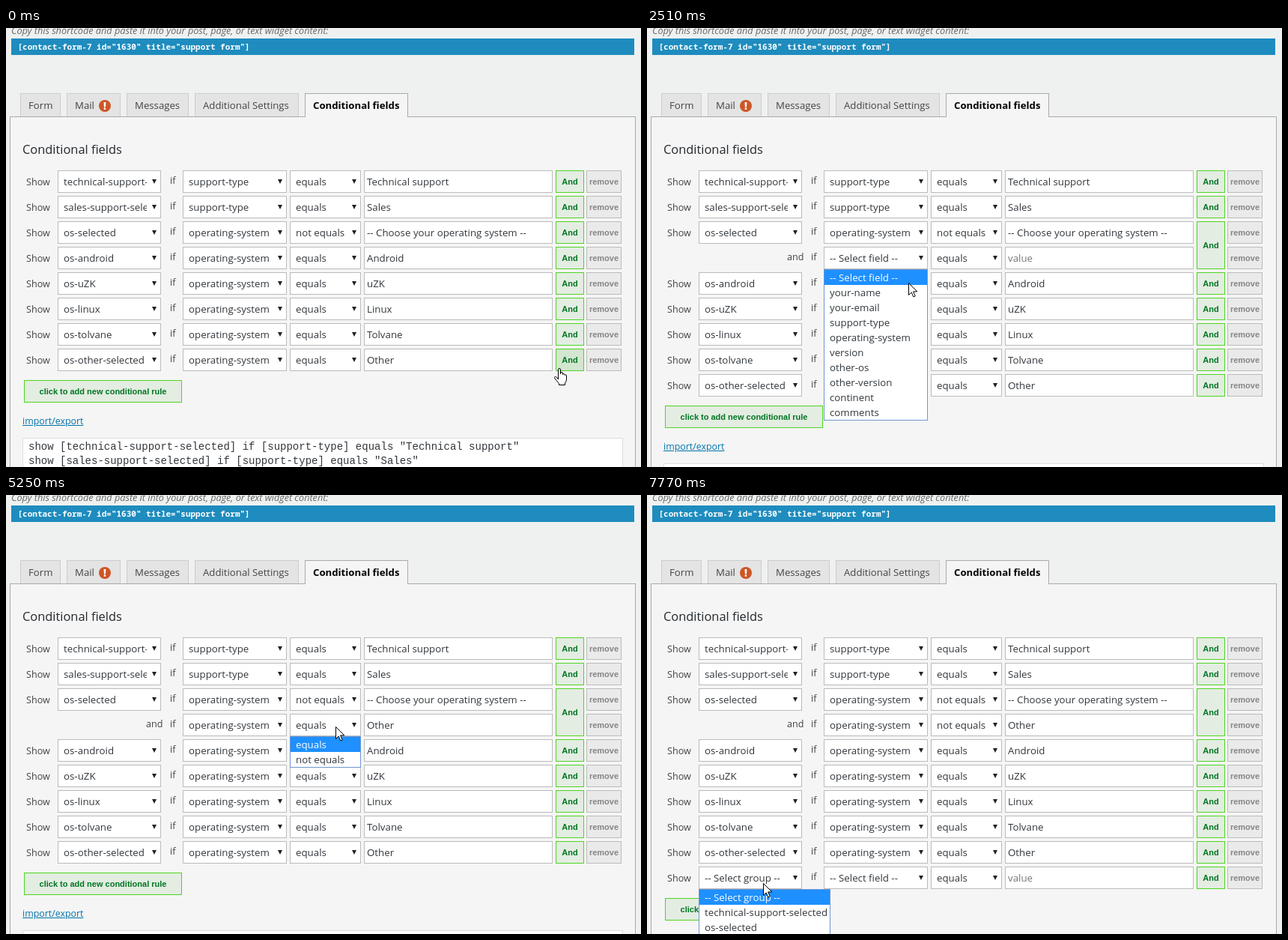
Recreate the animation shown at these times as an HTML page. Size 848 by 586 pixels, loop 8000 ms.

```html
<!DOCTYPE html>
<html lang="en">
<head>
<meta charset="utf-8">
<title>Conditional fields</title>
<style>
  html, body { margin: 0; width: 100%; height: 100%; overflow: hidden; background: #eff1f1; }
  body { font: 13.3px "Open Sans", "Noto Sans", sans-serif; color: #32373c; }
  #stage { position: relative; width: 848px; height: 586px; overflow: hidden; }
  #stage div, #stage svg { position: absolute; box-sizing: border-box; white-space: pre; }
  #stage .hidden { display: none; }
  .copy { font-size: 12.7px; font-style: italic; line-height: 20px; color: #666; }
  .code { background: #1e8cbe; color: #fff; font: 600 11px/22px "Noto Sans Mono", monospace; padding-left: 8.5px; }
  .panel { background: #f5f5f5; border: 1px solid #aaa; }
  .tab { background: #e4e4e4; border: 1px solid #ccc; border-bottom: 0; padding-left: 10px; font-size: 13.2px; line-height: 30px; color: #444; }
  .tab.on { background: #f5f5f5; border-color: #aaa; font-weight: 700; color: #000; }
  .badge { background: #ce5626; border-radius: 50%; color: #fff; font-weight: 800; line-height: 16px; text-align: center; }
  .title { font-size: 16.4px; font-weight: 500; line-height: 30px; color: #23282d; }
  .label { font-size: 12.6px; line-height: 30px; color: #444; }
  .select, .input { background: #fff; border: 1px solid #bbb; line-height: 28px; }
  .select span { position: absolute; left: 7px; right: 18px; overflow: hidden; }
  .select::after { content: ""; position: absolute; right: 5px; top: 11px; border: solid transparent; border-width: 6px 3.5px 0; border-top-color: #222; }
  .input { padding-left: 3px; }
  .input .empty { color: #777; }
  .caret { position: absolute; top: 4px; height: 19px; width: 1px; background: #000; }
  .button { font: 700 11px "Liberation Sans", Arial, sans-serif; display: flex; align-items: center; justify-content: center; }
  .add { border: 1px solid #4ed521; color: #007521; background: rgba(75, 169, 61, .1); }
  .add.hover { background: rgba(75, 169, 61, .2); }
  .remove { border: 1px solid #bbb; color: #858585; background: rgba(133, 133, 133, .1); }
  .link { font-size: 12.4px; line-height: 20px; color: #0073aa; text-decoration: underline; }
  .area { background: #fff; border: 1px solid #ddd; padding: 2px 7px; font: 14px/19px "Liberation Mono", "Courier New", monospace; }
  .menu { background: #fff; border: 1px solid #6f96d2; }
  #stage .menu div { position: static; height: 20px; line-height: 20px; padding-left: 7px; }
  #stage .menu .hot { background: #1e90ff; color: #fff; }
  .cursor { overflow: visible; left: 0; top: 0; width: 1px; height: 1px; }
  .cursor path { fill: #fff; stroke: #000; stroke-linejoin: round; }
</style>
</head>
<body>
<div id="stage"></div>
<script>
const LOOP = 8000, STEP = 34;
const CLICK = { and: 840, fieldOpen: 2100, fieldPick: 3410, opOpen: 5250, opPick: 6170, rule: 7200, groupOpen: 7750 };
const TYPING = [[4120, 'O'], [4340, 'Ot'], [4390, 'Oth'], [4440, 'Othe'], [4590, 'Other']];

// Pointer path: time, x, y
const PATH = [
  [0, 738, 454], [30, 738, 454], [150, 743, 410], [300, 768, 300], [360, 769, 271], [420, 763, 280],
  [900, 763, 280], [1250, 665, 296], [1630, 496, 313], [2060, 350, 306], [2300, 350, 306], [2510, 349, 340],
  [3100, 346, 408], [3180, 346, 409], [3380, 346, 409], [3720, 490, 299], [3920, 530, 308],
  [4930, 530, 308], [5220, 440, 309], [5550, 440, 309], [5940, 454, 350], [6460, 454, 350],
  [6730, 89, 526], [7300, 89, 526], [7700, 155, 518], [LOOP, 155, 518]
];

const stage = document.getElementById('stage');

function box(parent, cls, x, y, w, h, html = '') {
  const el = document.createElement('div');
  el.className = cls;
  el.style.cssText = `left:${x}px;top:${y}px;` + (w ? `width:${w}px;height:${h}px` : '');
  el.innerHTML = html;
  parent.append(el);
  return el;
}

const layer = (parent = stage) => box(parent, '', 0, 0, 848, 586);
const select = (parent, x, y, w, text) =>
  box(parent, 'select', x, y, w, 30, `<span>${text}</span>`).firstChild;

function condition(parent, y, field, op, value) {
  box(parent, 'label', 219, y - 1, 0, 0, 'if');
  const parts = {
    field: select(parent, 236, y, 139, field),
    op: select(parent, 379, y, 95, op),
    input: box(parent, 'input', 478, y, 252, 30, value || '<span class="empty">value</span>')
  };
  box(parent, 'button remove', 775, y, 47, 30, 'remove');
  return parts;
}

function rule(parent, y, group, field, op, value) {
  box(parent, 'label', 27, y + 1, 0, 0, 'Show');
  select(parent, 69, y, 138, group);
  condition(parent, y, field, op, value);
  return box(parent, 'button add', 734, y, 38, 30, 'And');
}

function menu(x, y, w, items) {
  const el = box(stage, 'menu', x, y, w, items.length * 20 + 2);
  el.innerHTML = items.map(item => `<div>${item}</div>`).join('');
  return { el, y };
}

box(stage, 'copy', 7, -7, 0, 0, 'Copy this shortcode and paste it into your post, page, or text widget content:');
box(stage, 'code', 7, 14, 832, 22, '[contact-form-7 id="1630" title="support form"]');
box(stage, 'panel', 5, 118, 836, 500);
[['Form', 19, 54], ['Mail', 81, 72], ['Messages', 161, 83], ['Additional Settings', 252, 139]]
  .forEach(([text, x, w]) => box(stage, 'tab', x, 87, w, 31, text));
box(stage, 'tab on', 399, 87, 138, 32, 'Conditional fields');
box(stage, 'badge', 124, 96, 16, 16, '!');
box(stage, 'title', 22, 147, 0, 0, 'Conditional fields');

const OS = 'operating-system';
rule(stage, 190, 'technical-support-selected', 'support-type', 'equals', 'Technical support');
rule(stage, 224, 'sales-support-selected', 'support-type', 'equals', 'Sales');
const andButton = rule(stage, 258, 'os-selected', OS, 'not equals', '-- Choose your operating system --');

const extra = layer();
box(extra, 'label', 187, 291, 0, 0, 'and');
const added = condition(extra, 292, '-- Select field --', 'equals', '');

const lower = layer();
[['os-android', 'Android'], ['os-uZK', 'uZK'], ['os-linux', 'Linux'], ['os-tolvane', 'Tolvane'], ['os-other-selected', 'Other']]
  .forEach(([group, value], i) => rule(lower, 292 + i * STEP, group, OS, 'equals', value));

const newRule = layer();
rule(newRule, 496, '-- Select group --', '-- Select field --', 'equals', '');

const footer = layer();
box(footer, 'button add', 24, 470, 211, 30, 'click to add new conditional rule');
box(footer, 'link', 22, 515, 0, 0, 'import/export');
box(footer, 'area', 22, 547, 802, 160,
  'show [technical-support-selected] if [support-type] equals "Technical support"\n' +
  'show [sales-support-selected] if [support-type] equals "Sales"');

const fieldMenu = menu(236, 322, 139, ['-- Select field --', 'your-name', 'your-email', 'support-type', OS,
  'version', 'other-os', 'other-version', 'continent', 'comments']);
const opMenu = menu(379, 322, 95, ['equals', 'not equals']);
const groupMenu = menu(69, 526, 176, ['-- Select group --', 'technical-support-selected', 'os-selected',
  'sales-support-selected']);

const SHAPES = {
  arrow: 'M.5.5v16l3.7-3.6 2.6 6 2.4-1-2.6-6h5.2z',
  hand: 'M-.5 13V2a1.5 1.5 0 0 1 3 0v6V7a1.5 1.5 0 0 1 3 0v1.5a1.4 1.4 0 0 1 2.6 0v1a1.3 1.3 0 0 1 2.4.5v5q0 3-2 5v2.5h-8v-2L-5 14q-1.2-2 .3-2.6 1.5-.4 2.7 1.6l1.5 2z',
  beam: 'M-3.5-6.5h3M.5-6.5h3M0-6V7M-3.5 7.5h3M.5 7.5h3'
};
stage.insertAdjacentHTML('beforeend', '<svg class="cursor"><path/></svg>');
const cursor = stage.lastChild, shape = cursor.firstChild;

function pointerAt(t) {
  const i = PATH.findIndex(p => p[0] > t);
  const [t0, x0, y0] = PATH[i - 1], [t1, x1, y1] = PATH[i];
  const k = (t - t0) / (t1 - t0);
  return [Math.round(x0 + (x1 - x0) * k), Math.round(y0 + (y1 - y0) * k)];
}

const toggle = (el, on) => el.classList.toggle('hidden', !on);
const setText = (el, text) => { if (el.textContent !== text) el.textContent = text; };

function showMenu({ el, y }, open, py) {
  toggle(el, open);
  const hot = Math.max(0, Math.floor((py - y - 1) / 20));
  [...el.children].forEach((item, i) => item.classList.toggle('hot', i === hot));
}

const buttons = [...stage.querySelectorAll('.button')];
const inputs = [...stage.querySelectorAll('.input')];

function draw(now) {
  const t = now % LOOP;
  const split = t >= CLICK.and, ruled = t >= CLICK.rule;
  const [x, y] = pointerAt(t);

  andButton.style.height = (split ? 64 : 30) + 'px';
  toggle(extra, split);
  toggle(newRule, ruled);
  lower.style.top = (split ? STEP : 0) + 'px';
  footer.style.top = STEP * (split + ruled) + 'px';

  setText(added.field, t < CLICK.fieldPick ? '-- Select field --' : OS);
  setText(added.op, t < CLICK.opPick ? 'equals' : 'not equals');
  const typed = TYPING.filter(([at]) => t >= at).pop();
  const caret = typed && t < CLICK.opOpen ? '<i class="caret"></i>' : '';
  added.input.innerHTML = typed ? typed[1] + caret : '<span class="empty">value</span>';

  showMenu(fieldMenu, t >= CLICK.fieldOpen && t < CLICK.fieldPick, y);
  showMenu(opMenu, t >= CLICK.opOpen && t < CLICK.opPick, y);
  showMenu(groupMenu, t >= CLICK.groupOpen, y);

  const origin = stage.getBoundingClientRect();
  const under = el => {
    const r = el.getBoundingClientRect(), px = x + origin.left, py = y + origin.top;
    return px >= r.left && px < r.right && py >= r.top && py < r.bottom;
  };
  const hovered = buttons.find(under);
  buttons.forEach(b => b.classList.toggle('hover', b === hovered));
  const kind = hovered ? 'hand' : inputs.some(under) ? 'beam' : 'arrow';
  shape.setAttribute('d', SHAPES[kind]);
  cursor.style.transform = `translate(${x + (kind === 'beam' ? .5 : 0)}px, ${y}px)`;
}

function frame() {
  draw(performance.now());
  requestAnimationFrame(frame);
}
frame();
</script>
</body>
</html>
```
